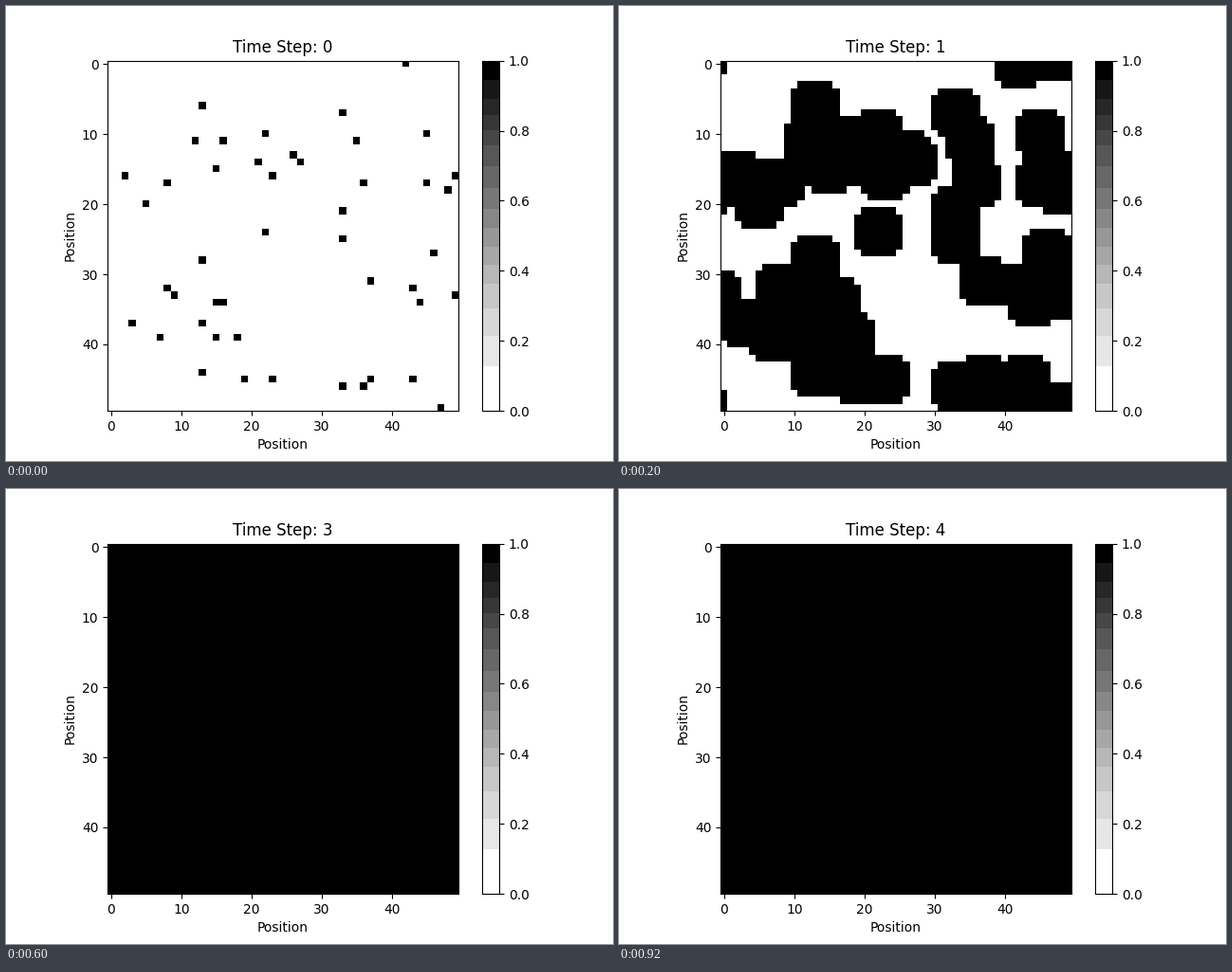
A matplotlib script for the animation above (1 s loop, 640 px wide and 480 px high).

```python
import matplotlib.pyplot as plt
import numpy as np
from matplotlib.animation import FuncAnimation
from matplotlib.colors import ListedColormap

SIZE, STEPS, REACH = 50, 5, 4

# Live columns by row at the start
SEEDS = {
    0: [42], 6: [13], 7: [33], 10: [22, 45], 11: [12, 16, 35], 13: [26],
    14: [21, 27], 15: [15], 16: [2, 23, 49], 17: [8, 36, 45], 18: [48],
    20: [5], 21: [33], 24: [22], 25: [33], 27: [46], 28: [13], 31: [37],
    32: [8, 43], 33: [9, 49], 34: [15, 16, 44], 37: [3, 13],
    39: [7, 15, 18], 44: [13], 45: [19, 23, 37, 43], 46: [33, 36], 49: [47],
}
OFFSETS = [(dy, dx)
           for dy in range(1 - REACH, REACH)
           for dx in range(1 - REACH, REACH)
           if dy * dy + dx * dx < REACH * REACH]


def initial_grid():
    grid = np.zeros((SIZE, SIZE))
    for row, cols in SEEDS.items():
        grid[row, cols] = 1
    return grid


def grow(grid):
    """Switch on every cell near a live one, wrapping at the edges."""
    return np.max([np.roll(grid, shift, axis=(0, 1)) for shift in OFFSETS], axis=0)


def banded_greys():
    """Greys reduced to sixteen flat tones."""
    levels = np.round(plt.get_cmap("Greys")(np.arange(256))[:, 0] * 255) // 16
    tones = levels * 16 + 7
    tones[levels == 0] = 0
    tones[levels == 15] = 255
    return ListedColormap(np.repeat(tones[:, None] / 255, 3, axis=1))


grids = [initial_grid()]
while len(grids) < STEPS:
    grids.append(grow(grids[-1]))

fig, ax = plt.subplots(figsize=(6.4, 4.8), dpi=100)
image = ax.imshow(grids[0], cmap=banded_greys(), vmin=0, vmax=1,
                  interpolation="nearest")
fig.colorbar(image, ax=ax)
ax.set(xlabel="Position", ylabel="Position")
title = ax.set_title("Time Step: 0")


def update(step):
    image.set_data(grids[step])
    title.set_text(f"Time Step: {step}")
    return image, title


anim = FuncAnimation(fig, update, frames=STEPS, interval=200,
                     repeat=True, repeat_delay=0)
plt.show()
```
